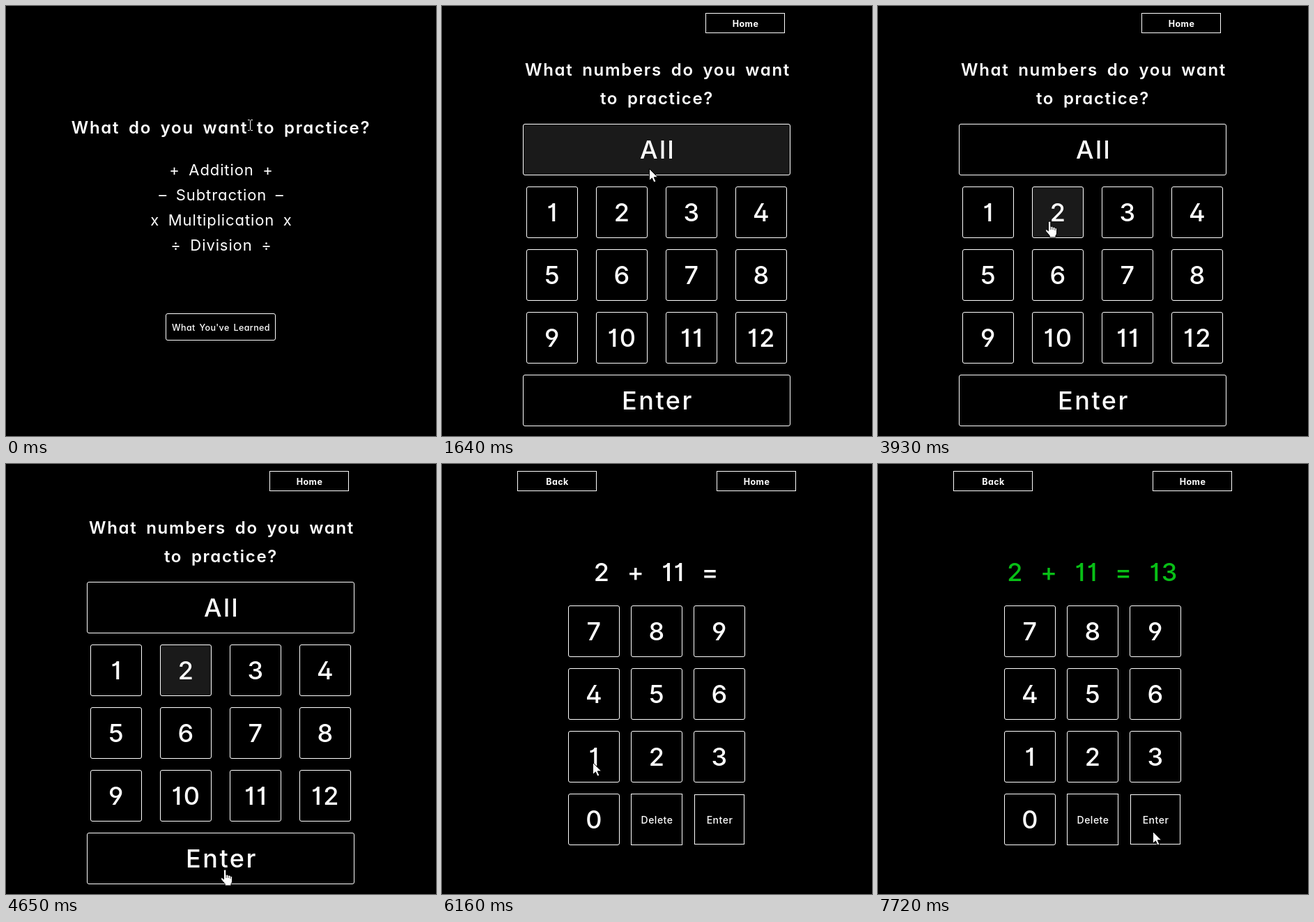
An HTML page that plays this animation: 617 px wide and 617 px high, repeating every 8000 ms.

```html
<!DOCTYPE html>
<html lang="en">
<head>
<meta charset="utf-8">
<title>Math practice</title>
<style>
  html, body { margin: 0; width: 100%; height: 100%; overflow: hidden; background: #000; }
  svg { display: block; width: 100vw; height: 100vh; }
  text {
    fill: #fff; text-anchor: middle; white-space: pre;
    font-family: Inter, "Open Sans", sans-serif;
    font-feature-settings: "cv01", "cv02", "cv04", "cv11", "calt" 0;
  }
  rect { fill: #000; stroke: #fff; }
  rect.on { fill: #1a1a1a; }
  .title { font-size: 24px; font-weight: 600; letter-spacing: 1.7px; word-spacing: 5px; }
  .menu { font-size: 22px; letter-spacing: .9px; word-spacing: 5.5px; }
  .key { font-size: 36px; font-weight: 500; letter-spacing: 2.5px; }
  .sum { font-size: 36px; font-weight: 500; letter-spacing: 2.5px; word-spacing: 11px; }
  .label { font-size: 14px; font-weight: 500; letter-spacing: .5px; }
  .learned { font-size: 12.5px; font-weight: 500; letter-spacing: .4px; word-spacing: 2px; }
  .nav { font-size: 12.5px; font-weight: 700; letter-spacing: .4px; }
  .right { fill: #08bf16; }
</style>
</head>
<body>
<svg id="stage" viewBox="0 0 617 617"></svg>
<script>
const LOOP = 8000;
const text = (cls, x, y, s, id = '') =>
  `<text class="${cls}" x="${x}" y="${y}" ${id && `id="${id}"`}>${s}</text>`;
const box = (x, y, w, h, r = 0, id = '') =>
  `<rect x="${x + .5}" y="${y + .5}" width="${w}" height="${h}" rx="${r}" ${id && `id="${id}"`}/>`;
const nav = (x, s) => box(x, 10, 113, 28) + text('nav', x + 57.5, 29.5, s);
const key = (x, y, s, id) => box(x, y, 73, 73, 2.5, id) + text('key', x + 38, y + 50, s);
const wide = (y, s, id) => box(116, y, 383, 73, 2.5, id) + text('key', 309.5, y + 50, s);

function homeScreen() {
  const items = ['+ Addition +', '– Subtraction –', 'x Multiplication x', '÷ Division ÷'];
  return text('title', 308.5, 183, 'What do you want to practice?') +
    items.map((s, i) => text('menu', 309, 243 + 36 * i, s)).join('') +
    box(229, 441, 157, 38, 2.5) + text('learned', 308.5, 465.5, "What You've Learned");
}

function numberScreen() {
  let out = nav(378, 'Home') +
    text('title', 309.5, 100, 'What numbers do you want') +
    text('title', 308.5, 141, 'to practice?') + wide(169, 'All', 'all');
  for (let i = 0; i < 12; i++)
    out += key(121 + 100 * (i % 4), 259 + 90 * Math.floor(i / 4), i + 1, 'pick' + (i + 1));
  return out + wide(529, 'Enter');
}

function sumScreen() {
  let out = nav(108, 'Back') + nav(394, 'Home') + text('sum', 308.5, 168, '', 'sum');
  for (let n = 1; n <= 9; n++)
    out += key(181 + 90 * ((n - 1) % 3), 383 - 90 * Math.floor((n - 1) / 3), n, 'pad' + n);
  return out + key(181, 473, 0) +
    box(271, 473, 73, 73) + text('label', 308.5, 516, 'Delete') +
    box(362, 474, 71, 71, 0, 'enter') + text('label', 398.5, 516, 'Enter');
}

const cursors = {
  arrow: '<path fill="#fff" stroke="#000" d="M.5 -.5V16.6l3.9-3.7 2.6 6.1 2.9-1.2-2.7-6h5.5z"/>',
  beam: '<path fill="none" stroke="#fff" d="M-3 -7.5H-.5L.5 -6.5 1.5 -7.5H4M.5 -6.5V6.5M-3 7.5H-.5L.5 6.5 1.5 7.5H4"/>',
  hand: '<path fill="#fff" stroke="#000" d="M-1.6 1.5q0-1.6 1.7-1.6t1.7 1.6V7.6q2.3-.9 3.1.8 2.3-.8 3 .9 2.6-.4 2.7 2V16q0 3-1.6 4.4V23H.2V20.6L-5 14.4q-1.2-2 .3-2.6 1.2-.3 3.1 2z"/>' +
    '<path stroke="#000" stroke-width=".8" d="M2 8v4M5 9v3M8 10v3"/>'
};

// Each move runs in equal steps along its waypoints; from step "turn" the shape becomes "then".
const moves = [
  { from: 90, to: 800, steps: 9, at: [[350, 171], [336, 186], [306, 216], [293, 232], [297, 234]], shape: 'beam' },
  { from: 1640, to: 1640, steps: 1, at: [[297, 234], [297, 234]], shape: 'arrow' },
  { from: 2450, to: 3220, steps: 10, at: [[297, 234], [270, 248], [234, 270], [220, 284], [226, 292], [246, 307]], shape: 'arrow', then: 'hand', turn: 7 },
  { from: 3310, to: 3470, steps: 3, at: [[246, 307], [251, 308], [246, 307]], shape: 'hand' },
  { from: 3650, to: 3650, steps: 1, at: [[246, 307], [245, 307]], shape: 'hand' },
  { from: 3930, to: 4200, steps: 4, at: [[245, 307], [246, 309], [262, 350], [296, 430], [310, 478]], shape: 'hand', then: 'beam', turn: 4 },
  { from: 4380, to: 4650, steps: 4, at: [[310, 478], [313, 535], [314, 572], [314, 582]], shape: 'arrow', then: 'hand', turn: 2 },
  { from: 4920, to: 4920, steps: 1, at: [[314, 582], [313, 582]], shape: 'arrow' },
  { from: 5530, to: 6250, steps: 9, at: [[313, 582], [328, 560], [300, 500], [240, 445], [218, 430], [218, 430]], shape: 'arrow' },
  { from: 6340, to: 7060, steps: 9, at: [[218, 430], [300, 427], [368, 430], [388, 430]], shape: 'arrow' },
  { from: 7150, to: 7420, steps: 4, at: [[388, 430], [394, 475], [395, 515], [394, 528]], shape: 'arrow' }
];

// Catmull-Rom curve through the waypoints, u from 0 to 1.
function along(points, u) {
  const s = u * (points.length - 1);
  const i = Math.min(Math.floor(s), points.length - 2), f = s - i;
  const p = k => points[Math.max(0, Math.min(points.length - 1, k))];
  return [0, 1].map(c => {
    const [a, b, d, e] = [p(i - 1)[c], p(i)[c], p(i + 1)[c], p(i + 2)[c]];
    return b + f / 2 * (d - a + f * (2 * a - 5 * b + 4 * d - e + f * (3 * (b - d) + e - a)));
  });
}

function pointer(t) {
  const m = moves.filter(m => m.from <= t).pop();
  if (!m) return { pos: moves[0].at[0], shape: 'beam' };
  const gap = (m.to - m.from) / Math.max(1, m.steps - 1) || 1;
  const step = Math.min(m.steps, 1 + Math.floor((t - m.from) / gap + 1e-6));
  const shape = m.then && step >= m.turn ? m.then : m.shape;
  return { pos: along(m.at, step / m.steps), shape };
}

const stage = document.getElementById('stage');
const group = (id, body) => `<g id="${id}">${body}</g>`;
stage.innerHTML = group('home', homeScreen()) + group('numbers', numberScreen()) +
  group('sums', sumScreen()) +
  group('cursor', Object.entries(cursors).map(([id, d]) => group(id, d)).join(''));
const el = id => document.getElementById(id);
const show = (id, on) => el(id).setAttribute('display', on ? 'inline' : 'none');
const light = (id, on) => el(id).classList.toggle('on', on);

function draw(t) {
  const within = (a, b) => t >= a && t < b;
  show('home', t < 1640);
  show('numbers', within(1640, 4830));
  show('sums', t >= 4830);
  light('all', t < 3930);
  light('pick2', t >= 3930);
  light('pad1', within(6250, 6340));
  light('pad3', within(7060, 7150));
  light('enter', within(7560, 7720));

  el('sum').textContent = '2 + 11 =' + (t >= 7150 ? ' 13' : t >= 6340 ? ' 1' : '');
  el('sum').classList.toggle('right', t >= 7720);

  const { pos, shape } = pointer(t);
  for (const id in cursors) show(id, id === shape);
  el('cursor').setAttribute('transform', `translate(${pos.map(Math.round)})`);
}

const start = performance.now();
function tick(now) {
  draw(Math.max(0, now - start) % LOOP);
  requestAnimationFrame(tick);
}
draw(0);
requestAnimationFrame(tick);
</script>
</body>
</html>
```
